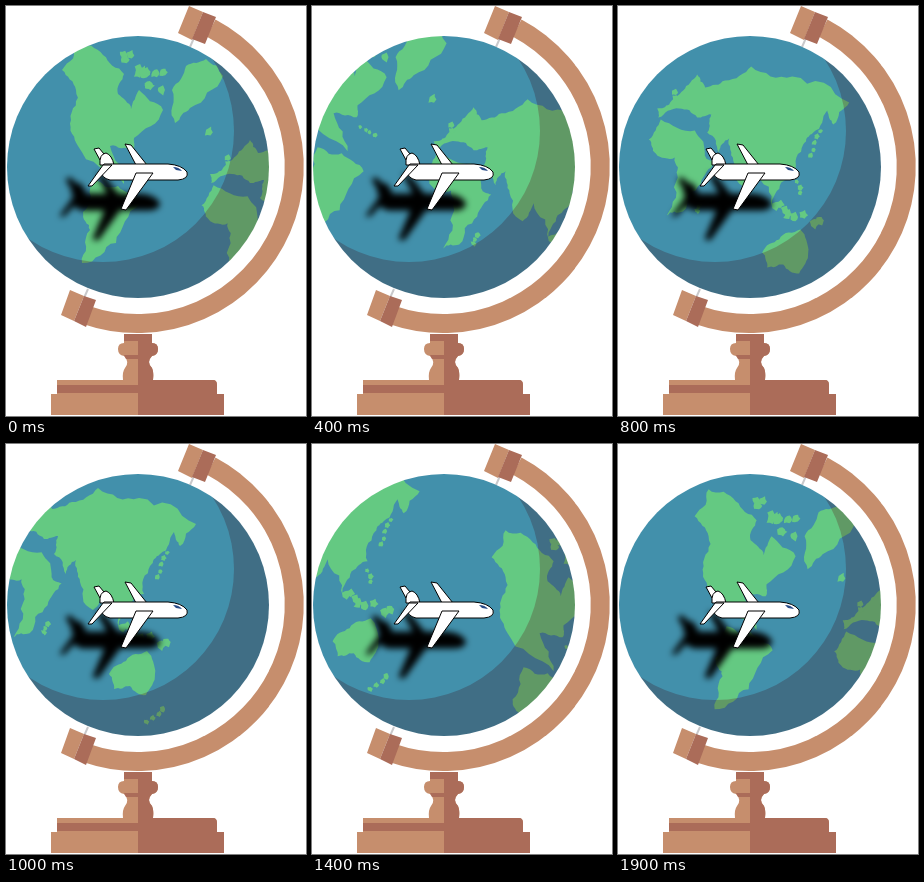
An HTML page for the animation above (2000 ms loop, 300 by 410 pixels).

```html
<!DOCTYPE html>
<html lang="en">
<head>
<meta charset="utf-8">
<title>Plane over a turning globe</title>
<style>
  html, body { margin: 0; width: 100%; height: 100%; overflow: hidden; background: #fff; }
  svg { display: block; width: 300px; height: 410px; }
  .light { fill: #c68e6d; }
  .dark { fill: #ab6c59; }
  #map { fill: #64c982; }
  #night { fill: #f5c2c6; mix-blend-mode: multiply; }
</style>
</head>
<body>
<svg viewBox="0 0 300 410">
  <defs>
    <clipPath id="globe"><circle cx="132" cy="161" r="131"/></clipPath>
    <mask id="shade">
      <rect width="300" height="410" fill="#fff"/>
      <circle cx="97" cy="125" r="131" fill="#000"/>
    </mask>
    <filter id="blur" x="-30%" y="-30%" width="160%" height="160%"><feGaussianBlur stdDeviation="3.4"/></filter>
    <g id="plane" stroke-linejoin="round">
      <path d="M119 138L125 139L141 159L130 159Z"/>
      <path d="M88 143L93 142L98 148L94 154Z"/>
      <path d="M94 159Q93 148 100 147Q106 149 108 159Z"/>
      <path d="M98 158H162Q176 159 181 166Q183 173 172 174H104Q95 172 95 164Z"/>
      <path d="M97 159H106L86 180H82Z"/>
      <path d="M130 167H147L120 204L115 203Z"/>
    </g>
    <g id="world"></g>
    <path id="base" d="M118 328H146V337Q152 337 152 343Q152 349 146 350Q140 356 146 362Q148 366 147 374H207Q211 374 211 379V388H218V409H45V388H51V374H117Q116 366 119 362Q124 356 118 350Q112 349 112 343Q112 337 118 337Z"/>
    <clipPath id="right"><rect x="132" y="320" width="90" height="90"/></clipPath>
  </defs>

  <!-- stand -->
  <path d="M205 22A157 157 0 0 1 80 309" fill="none" stroke="#c68e6d" stroke-width="19"/>
  <path d="M188 32L184 41M82 283L78 292" stroke="#c9c9cb" stroke-width="2"/>
  <path class="light" d="M183 0L197 6L186 34L172 27ZM64 284L78 290L68 315L55 309Z"/>
  <path class="dark" d="M197 6L210 11L199 38L186 33ZM78 290L90 294L80 321L68 315Z"/>
  <use href="#base" class="light"/>
  <path class="dark" d="M118 328H132V335H118ZM118 349H132V353H120ZM51 379H132V387H51Z"/>
  <use href="#base" class="dark" clip-path="url(#right)"/>

  <!-- globe -->
  <g clip-path="url(#globe)">
    <rect width="300" height="410" fill="#4290ab"/>
    <g id="map">
      <use href="#world" x="-412" y="-164"/>
      <use href="#world"/>
      <use href="#world" x="412" y="164"/>
    </g>
    <rect id="night" width="300" height="410" mask="url(#shade)"/>
  </g>

  <use href="#plane" x="-28" y="30" stroke="#000" filter="url(#blur)"/>
  <use href="#plane" fill="#fff" stroke="#000"/>
  <path d="M167 161Q173 161 176 165L170 164Z" fill="#274a86"/>
</svg>
<script>
const LOOP = 2, STEP = 0.1;
const SPEED = { x: 206, y: 82 }; // px per second, up and to the left

let seed = 7;
const random = () => (seed = seed * 16807 % 2147483647) / 2147483647;
const spread = size => (random() - 0.5) * size;

// Splits every side at a displaced midpoint, again and again, into a ragged coast.
function coast(points, depth = 3) {
  if (!depth) return `<polygon points="${points.join(' ')}"/>`;
  return coast(points.flatMap(([x, y], i) => {
    const [nextX, nextY] = points[(i + 1) % points.length];
    const bend = spread(0.3);
    return [[x, y], [(x + nextX) / 2 + (nextY - y) * bend, (y + nextY) / 2 - (nextX - x) * bend]];
  }), depth - 1);
}

// Small islands scattered along a line.
function islands(count, size, x1, y1, x2, y2, scatter = 2) {
  return Array.from({ length: count }, (_, i) => {
    const along = (i + 0.5) / count;
    const x = x1 + (x2 - x1) * along + spread(scatter);
    const y = y1 + (y2 - y1) * along + spread(scatter);
    const corners = [0, 1, 2, 3, 4].map(k => {
      const angle = k * Math.PI * 0.4, radius = size * (0.6 + random() * 0.6);
      return [x + radius * Math.cos(angle), y + radius * Math.sin(angle)];
    });
    return coast(corners, 1);
  }).join('');
}

// Key points of the coasts where they lie on the stage at the given second.
const at = (time, ...shapes) =>
  `<g transform="translate(${time * SPEED.x} ${time * SPEED.y})">${shapes.join('')}</g>`;

const northAmerica = coast([[56, 64], [70, 37], [97, 49], [118, 68], [112, 88], [125, 103], [133, 84], [157, 104],
  [128, 132], [127, 144], [104, 140], [118, 178], [72, 140], [65, 114], [70, 84]]);
const southAmerica = coast([[88, 174], [112, 180], [134, 198], [110, 237], [76, 257], [84, 224], [77, 206]]);
const greenland = coast([[166, 84], [180, 60], [200, 53], [217, 70], [184, 102], [169, 117]]);
const africa = coast([[84, 130], [72, 150], [79, 164], [98, 168], [101, 188], [90, 226], [106, 222], [124, 194],
  [138, 172], [128, 166], [118, 141]]);
const eurasia = coast([[-2, 86], [-1, 95], [20, 86], [38, 95], [52, 92], [48, 110], [60, 130], [70, 116], [74, 138],
  [87, 166], [98, 148], [113, 184], [122, 160], [138, 150], [144, 122], [154, 110], [168, 88], [174, 102],
  [190, 80], [133, 54], [92, 44], [66, 58], [46, 65], [38, 52], [24, 68], [10, 82]]);
const australia = coast([[103, 230], [120, 217], [141, 207], [149, 230], [140, 251], [124, 242], [108, 245]]);

const arctic = islands(14, 5, 122, 56, 154, 80, 22);
const iceland = islands(1, 5, 203, 127, 203, 127);
const caribbean = islands(4, 2.5, 128, 152, 148, 164);
const madagascar = islands(3, 3, 125, 211, 119, 223, 0);
const britain = islands(2, 4, 15, 68, 18, 79);
const japan = islands(5, 3, 162, 106, 150, 136);
const philippines = islands(3, 3, 138, 156, 143, 174);
const indonesia = islands(8, 5, 108, 180, 160, 204, 10);
const newZealand = islands(4, 3, 160, 264, 139, 280);

document.getElementById('world').innerHTML =
  at(0, northAmerica, southAmerica, greenland, arctic, iceland, caribbean) +
  at(0.6, africa, madagascar) +
  at(1, eurasia, australia, britain, japan, philippines, indonesia, newZealand);

const map = document.getElementById('map');
function draw() {
  const time = Math.floor(performance.now() / 1000 % LOOP / STEP) * STEP;
  map.setAttribute('transform', `translate(${-time * SPEED.x} ${-time * SPEED.y})`);
  requestAnimationFrame(draw);
}
draw();
</script>
</body>
</html>
```
